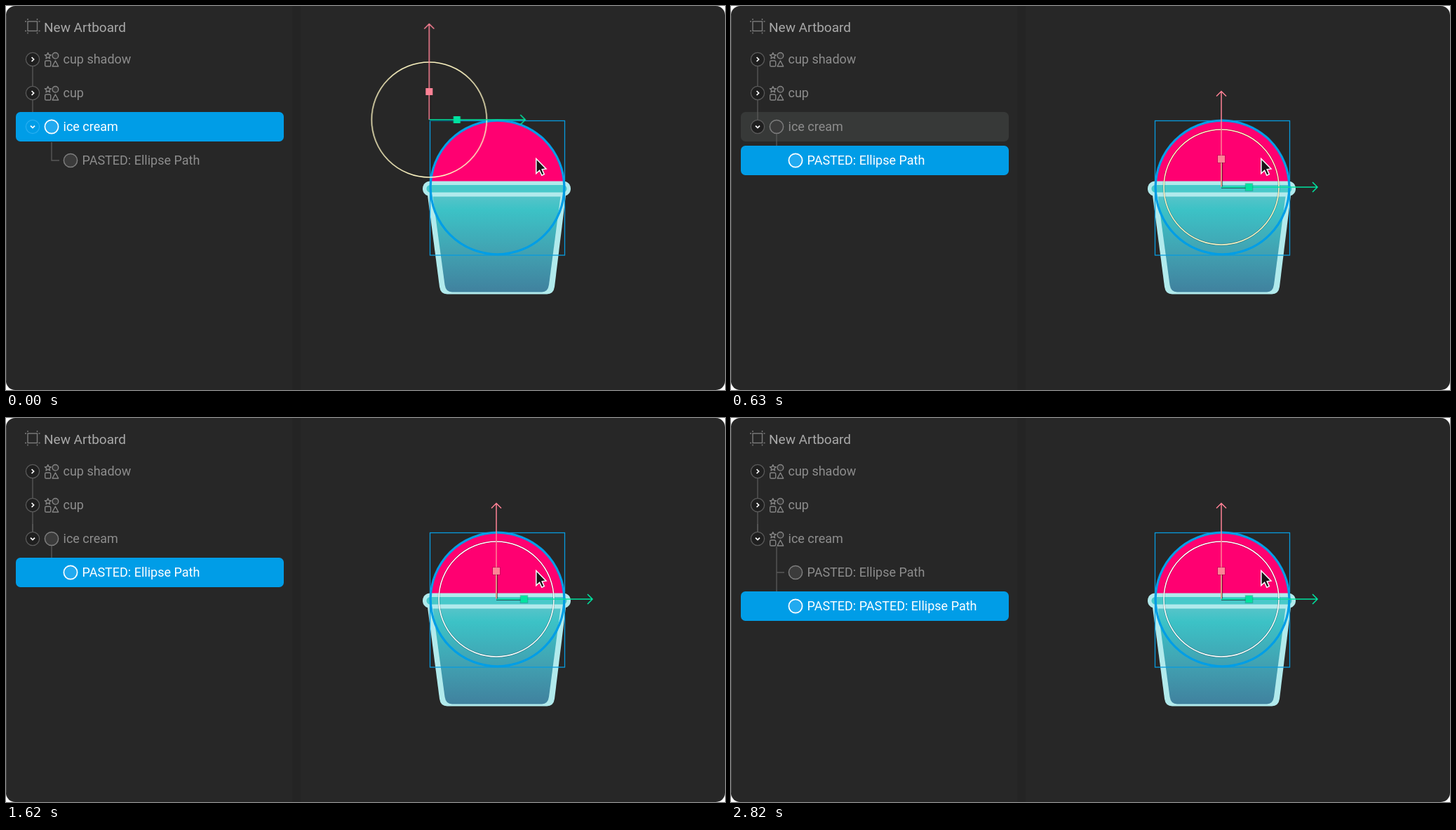
Recreate the animation shown at these times as an HTML page. Size 1025 by 547 pixels, loop 2.85 s.

```html
<!DOCTYPE html>
<html lang="en">
<head>
<meta charset="utf-8">
<title>Layer tree and cup</title>
<style>
html, body { margin: 0; width: 100%; height: 100%; overflow: hidden; background: #fff; }
svg { display: block; width: 1025px; height: 547px; }
text { font: 400 18px Roboto, sans-serif; fill: #8d8d8d; white-space: pre; }
.title { font-size: 19px; fill: #a9a9a9; }
.on { fill: #fff; }
.line { fill: none; stroke: #5a5a5a; stroke-width: 1.3; }
.bar { fill: #009de7; }

/* Hard cuts at 525, 1470 and 1830 ms */
.parent, .hover, .child, .group, .plain, .gizmo, .ring {
  animation: 2850ms step-end infinite;
}
.parent { animation-name: parent; }
.hover { animation-name: hover; }
.child { animation-name: child; }
.group { animation-name: group; }
.plain { animation-name: plain; }
.gizmo { animation-name: gizmo; }
.ring { animation-name: ring; }
@keyframes parent { 0% { opacity: 1 } 18.42%, 100% { opacity: 0 } }
@keyframes plain { 0% { opacity: 0 } 18.42%, 100% { opacity: 1 } }
@keyframes hover { 0% { opacity: 0 } 18.42% { opacity: 1 } 51.58%, 100% { opacity: 0 } }
@keyframes child { 0% { opacity: 0 } 18.42% { opacity: 1 } 64.21%, 100% { opacity: 0 } }
@keyframes group { 0% { opacity: 0 } 64.21%, 100% { opacity: 1 } }
@keyframes gizmo {
  0% { transform: translate(603.3px, 162px) }
  18.42%, 100% { transform: translate(699px, 258px) }
}
@keyframes ring { 0% { stroke: #fdf5c2 } 51.58%, 100% { stroke: #fff } }
</style>
</head>
<body>
<svg viewBox="0 0 1025 547">
  <defs>
    <linearGradient id="cupFill" x1="0" y1="0" x2="0" y2="1">
      <stop offset="0" stop-color="#55c4c9"/>
      <stop offset=".14" stop-color="#3cc2c6"/>
      <stop offset=".55" stop-color="#41a4b3"/>
      <stop offset="1" stop-color="#40819e"/>
    </linearGradient>
    <g id="shapes" fill="#333" stroke="#858585" stroke-width="1.4" stroke-linejoin="round">
      <path fill="none" d="M-5.2-9.4l1.3 2.8 3.1.3-2.3 2.1.7 3-2.8-1.6-2.8 1.6.7-3-2.3-2.1 3.1-.3z"/>
      <circle cx="5.4" cy="-5.2" r="4.3"/>
      <rect x="-9.3" y="2" width="8" height="8" rx="1.6" fill="none"/>
      <path fill="none" d="M5.4 2l4.3 8H1.1z"/>
    </g>
    <g id="knob">
      <circle r="9.6" fill="#1f1f1f" stroke="#5a5a5a" stroke-width="1.3"/>
    </g>
    <path id="chevron" d="M-1.4-3l3 3-3 3" fill="none" stroke="#fff" stroke-width="1.7"/>
    <g id="closed"><use href="#knob"/><use href="#chevron"/></g>
    <g id="open"><use href="#knob"/><use href="#chevron" transform="rotate(90)"/></g>
    <circle id="dot" r="9.6" fill="#3b3b3b" stroke="#7d7d7d" stroke-width="1.5"/>
    <circle id="dotOn" r="9.6" fill="#22aaf0" stroke="#fff" stroke-width="1.7"/>
    <rect id="bar" x="14" y="-21" width="382" height="42" rx="6.5"/>
  </defs>

  <rect width="1025" height="547" rx="13" fill="#272727"/>
  <path d="M.5 13v521" stroke="#444"/>
  <rect x="408" width="12" height="547" fill="#242424"/>

  <!-- Layer tree -->
  <g fill="none" stroke="#7c7c7c" stroke-width="1.4">
    <rect x="31" y="22" width="13.5" height="13.5"/>
    <path d="M31 18v2M44.5 18v2M31 37.500v2M44.5 37.500v2M27 22h2M27 35.500h2M46.500 22h2M46.500 35.500h2"/>
  </g>
  <text class="title" x="54" y="36.500">New Artboard</text>
  <path class="line" d="M38 86v28M38 134v28"/>
  <use href="#closed" x="38" y="76"/>
  <use href="#shapes" x="65" y="76"/>
  <text x="81.500" y="82.400">cup shadow</text>
  <use href="#closed" x="38" y="124"/>
  <use href="#shapes" x="65" y="124"/>
  <text x="81.500" y="130.400">cup</text>

  <g class="parent">
    <use href="#bar" y="172" class="bar"/>
    <circle cx="38" cy="172" r="9.6" fill="none" stroke="#28aef0" stroke-width="1.2"/>
    <use href="#chevron" transform="translate(38 172) rotate(90)"/>
    <use href="#dotOn" x="65" y="172"/>
    <text class="on" x="81.500" y="178.400">ice cream</text>
    <path class="line" d="M65 194v26h11"/>
    <use href="#dot" x="92" y="220"/>
    <text x="108.500" y="226.400">PASTED: Ellipse Path</text>
  </g>

  <use href="#bar" y="172" class="hover" fill="#373938"/>
  <g class="plain">
    <path class="line" d="M38 151v11"/>
    <use href="#open" x="38" y="172"/>
    <text x="81.500" y="178.400">ice cream</text>
  </g>
  <g class="child">
    <path class="line" d="M65 182v17"/>
    <use href="#dot" x="65" y="172"/>
    <use href="#bar" y="220" class="bar"/>
    <use href="#dotOn" x="92" y="220"/>
    <text class="on" x="108.500" y="226.400">PASTED: Ellipse Path</text>
  </g>
  <g class="group">
    <use href="#shapes" x="65" y="172"/>
    <path class="line" d="M65 183v64M65 220h11"/>
    <use href="#dot" x="92" y="220"/>
    <text x="108.500" y="226.400">PASTED: Ellipse Path</text>
    <use href="#bar" y="268" class="bar"/>
    <use href="#dotOn" x="92" y="268"/>
    <text class="on" x="108.500" y="274.400">PASTED: PASTED: Ellipse Path</text>
  </g>

  <!-- Ice cream and cup -->
  <circle cx="700.500" cy="258.500" r="95" fill="#ff0071"/>
  <path fill="#b1eaec" d="M600 262L618 400Q619.500 410.500 629 410.500H771Q780.500 410.500 782 400L799 262Z"/>
  <path fill="url(#cupFill)" d="M608.500 271.500L625.500 397Q627 407.500 636 407.500H764Q772.500 407.500 774 397L790.500 271.500Z"/>
  <rect x="596.700" y="252.200" width="205.600" height="16" rx="8" fill="#48c9ca" stroke="#b1eaec" stroke-width="5.500"/>

  <!-- Selection -->
  <circle cx="700.500" cy="258.500" r="95.300" fill="none" stroke="#009ee6" stroke-width="3.200"/>
  <rect x="604.500" y="163.500" width="192" height="191.500" fill="none" stroke="#079bdf" stroke-width="1.300"/>

  <g class="gizmo" fill="none" stroke-width="1.500">
    <circle class="plain" r="82" stroke="#000" stroke-opacity=".22" stroke-width="3"/>
    <circle class="ring" r="82"/>
    <path stroke="#000" stroke-opacity=".5" d="M0 1.300H36M1.300 0V-36"/>
    <path stroke="#ff8296" d="M0 0V-136M-7-129.500L0-136.500 7-129.500"/>
    <path stroke="#00e3a0" d="M0 0H137M130-7L137 0 130 7"/>
    <path class="plain" stroke="#d6a482" d="M0-36V-2"/>
    <g class="plain" stroke="#000" stroke-opacity=".25">
      <rect x="-5" y="-45" width="10" height="10"/>
      <rect x="34.500" y="-5" width="10" height="10"/>
    </g>
    <rect x="-5" y="-45" width="10" height="10" fill="#ff8296"/>
    <rect x="34.500" y="-5" width="10" height="10" fill="#00e3a0"/>
  </g>

  <path d="M755.800 217.500V238.500L760.600 234.300 763.800 241.300 767.300 239.700 764.200 232.800 770 232Z" fill="#1c1418" stroke="#fff" stroke-width="1.500"/>
</svg>
</body>
</html>
```
